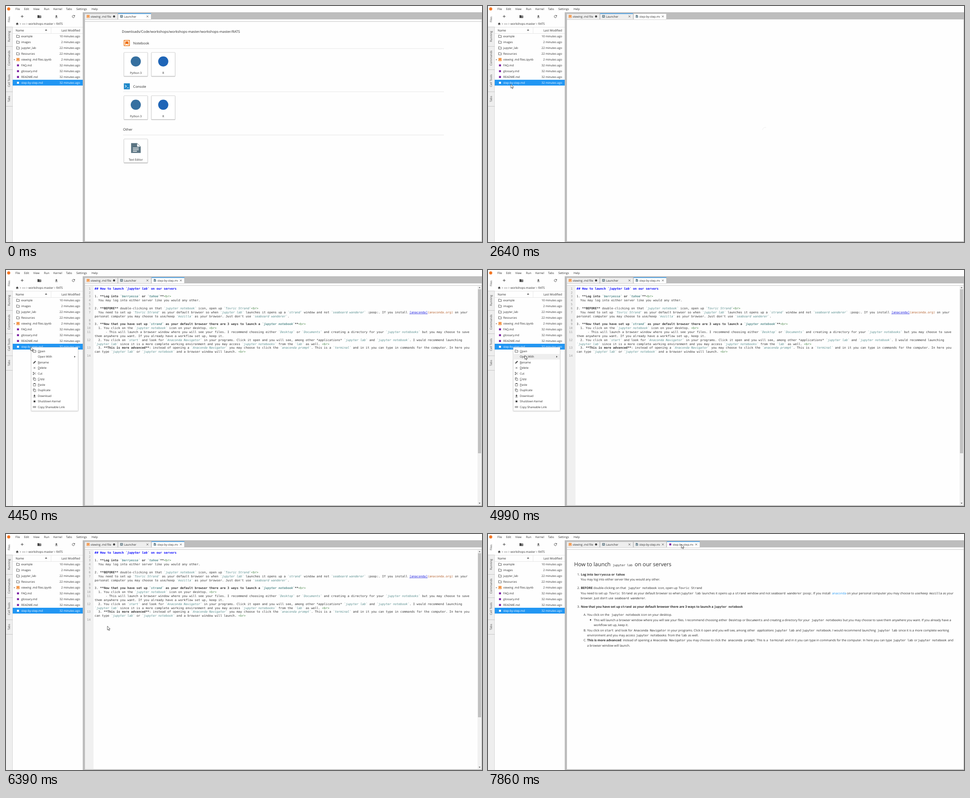
Write an HTML page that moves like this. It is 1061 px wide and 528 px high and loops after 8000 ms.

```html
<!DOCTYPE html>
<html lang="en">
<head>
<meta charset="utf-8">
<title>File browser</title>
<style>
html, body { margin: 0; width: 100%; height: 100%; overflow: hidden; background: #fff; }
svg { display: block; width: 1061px; height: 528px; }
text { font: 6.38px "Open Sans", "Noto Sans", sans-serif; fill: #2a2a2a; white-space: pre; text-rendering: geometricPrecision; }
.head { font-size: 6.6px; }
.side { fill: #444; text-anchor: middle; }
.mid { text-anchor: middle; }
.end { text-anchor: end; }
.on { fill: #fff; }
.big { font-size: 7.7px; }
.ed text { font: 6.743px "DejaVu Sans Mono", monospace; fill: #333; }
.ed .num { fill: #999; text-anchor: end; }
.ed .c { fill: #568c8c; font-style: italic; }
.ed .title { fill: #00f; font-weight: bold; }
.ed .title .c { fill: #00f; }
.ed .br { fill: #3f7f3f; }
.ed .link { fill: #1a1ae0; text-decoration: underline; }
.ed .url { fill: #b5622f; }
.md text { font-size: 6.87px; }
.md .title { font-size: 12.1px; }
.md .c { font: 6.65px "DejaVu Sans Mono", monospace; }
.md .b.c { font-weight: bold; }
.md .link { fill: #2196f3; }
.b { font-weight: bold; }
.i { font-style: italic; }
.line { fill: none; stroke: #424242; }
.dark { fill: #424242; }
</style>
</head>
<body>
<svg id="stage" viewBox="0 0 1061 528" xmlns="http://www.w3.org/2000/svg"></svg>
<script>
const BLUE = '#2196f3', ORANGE = '#ef6c00', PURPLE = '#7b1fa2', GREY = '#bdbdbd', PAPER = '#fefefe';
const esc = s => s.replace(/&/g, '&amp;').replace(/</g, '&lt;');
const rect = (x, y, w, h, fill, more = '') =>
  `<rect x="${x}" y="${y}" width="${w}" height="${h}" fill="${fill}" ${more}/>`;
const path = (d, more = 'class="line"') => `<path d="${d}" ${more}/>`;
const raw = (x, y, body, cls = '', more = '') =>
  `<text x="${x}" y="${y}" class="${cls}" ${more}>${body}</text>`;
const text = (x, y, s, cls, more) => raw(x, y, esc(s), cls, more);
const group = (id, body, more = '') => `<g id="${id}" ${more}>${body}</g>`;
const at = (x, y, body) => `<g transform="translate(${x} ${y})">${body}</g>`;

// Icons are centred on 0,0
const folder = path('M-3.2-2.6h2.5l.8.9h3.1v4.3h-6.4z', 'class="line" stroke-width=".8"');
const bookmark = (s, w) => rect(-s, -s, 2 * s, 2 * s, '#fff', `stroke="${ORANGE}" stroke-width="${w}"`) +
  path(`M${-s * .58} ${-s * .6}h${s * 1.16}v${s * 1.3}l${-s * .58} ${-s * .5}l${-s * .58} ${s * .5}z`, `fill="${ORANGE}"`);
const square = fill => rect(-2.2, -2.2, 4.4, 4.4, fill);
const page = path('M-2.6-3h3.4l1.8 1.8v4.2h-5.2z', 'fill="#607d8b"') +
  path('M-1.5 0h3M-1.5 1.4h3', 'stroke="#fff" stroke-width=".6"');
const rocket = rect(-2.8, -2.8, 5.6, 5.6, '#546e7a') +
  path('M-1.6 1.8L0-2L1.6 1.8M-1 .6h2', 'fill="none" stroke="#fff" stroke-width=".7"');
const cross = path('M-2-2l4 4M2-2l-4 4', 'class="line" stroke-width=".8"');
const upload = path('M-1-.2v-.1h-1.6L0-3l2.6 2.7H1V1h-2zM-2.6 1.9h5.2v1h-5.2z', 'class="dark"');

// Inline marks: ** bold, * italic, ` code, ^N moves to x = N
function spans(line, keep) {
  let bold = false, em = false, code = false, x = '';
  return line.split(/(\*\*|\*|`|<br>|\^\d+|\[\w+\]|\([\w.]+\))/).map(s => {
    if (!s) return '';
    if (s[0] === '^') { x = ` x="${s.slice(1)}"`; return ''; }
    const mark = s === '**' || s === '*' || s === '`';
    const was = { bold, em, code };
    if (s === '**') bold = !bold;
    if (s === '*') em = !em;
    if (s === '`') code = !code;
    if (mark && !keep) return '';
    const cls = [];
    if (bold || was.bold) cls.push('b');
    if (em || was.em) cls.push('i');
    if (code || was.code) cls.push('c');
    if (s === '<br>') cls.push('br');
    if (s[0] === '[') { cls.push('link'); if (!keep) s = s.slice(1, -1); }
    if (s[0] === '(') cls.push('url');
    const out = `<tspan class="${cls.join(' ')}"${x}>${esc(s)}</tspan>`;
    x = '';
    return out;
  }).join('');
}

function sidebar() {
  let out = rect(0, 14, 15, 514, '#eee') + rect(0, 14, 15, 33, '#fff');
  for (const y of [47, 90.5, 142.5, 192, 224.5]) out += rect(0, y - .5, 15, .8, GREY);
  [['Files', 30], ['Running', 68], ['Commands', 116.5], ['Cell Tools', 167], ['Tabs', 208]].forEach(([s, y]) => {
    out += text(0, 0, s, 'side', `transform="translate(8.8 ${y}) rotate(-90)"`);
  });
  return out + rect(14.5, 47, .8, 481, GREY);
}

function files() {
  let out = rect(15, 14, 156, 514, PAPER);
  out += path('M36 20.3v6M33 23.3h6', 'class="line" stroke-width="1"');
  out += path('M70.2 20.6h3l1 1h4.2v5.2h-8.2z', 'class="dark"') + path('M76 22.6v3M74.5 24.1h3', 'stroke="#fff" stroke-width=".7"');
  out += at(112.3, 23.6, upload);
  out += path('M152.6 22a2.7 2.7 0 1 0 .3 2.3', 'class="line" stroke-width=".9"') + path('M153.6 20.2v2.9h-2.9z', 'class="dark"');
  out += path('M25 37l3 2.8h-.9v2.7h-1.5v-1.8h-1.2v1.8h-1.5v-2.7H22z', 'class="dark"');
  for (const x of [31.2, 45.6, 107.6]) out += path(`M${x} 38.2l1.7 1.8l-1.7 1.8`, 'class="line" stroke-width=".6"');
  for (const x of [37, 39.6, 42.2]) out += `<circle cx="${x}" cy="40.2" r=".8" class="dark"/>`;
  out += text(50, 42.3, 'workshops-master') + text(112, 42.3, 'RATS');
  out += rect(15, 47.2, 156, .7, '#ddd') + rect(15, 61, 156, .7, '#ddd') + rect(100, 48, .7, 13, '#ddd');
  out += text(21.5, 56.7, 'Name', 'head') + text(165, 56.7, 'Last Modified', 'head end');
  out += path('M86.8 55h5l-2.5-2.7z', 'class="dark"');
  const names = ['example', 'images', 'jupyter_lab', 'Resources', 'viewing .md files.ipynb',
    'FAQ.md', 'glossary.md', 'README.md', 'step-by-step.md'];
  const ages = [10, 2, 22, 22, 2];
  names.forEach((name, i) => {
    const y = 68 + 13 * i, on = i === 8, cls = on ? 'on' : '';
    if (on) out += rect(15, 165, 156, 13, BLUE);
    out += at(26.7, y - .2, i < 4 ? folder : i === 4 ? bookmark(2.8, 1) : square(on ? '#fff' : PURPLE));
    out += text(34, y + 2.2, name, cls) + text(165, y + 2.2, `${ages[i] || 32} minutes ago`, 'end ' + cls);
  });
  return out + '<circle cx="18.6" cy="120.2" r=".9" class="dark"/>' + rect(171, 14, 4.5, 514, GREY);
}

function launcher() {
  let out = rect(176, 34.3, 884, .9, GREY) +
    text(258.3, 60.2, 'Downloads/Code/workshops/workshops-master/workshops-master/RATS', 'big');
  const card = (x, y, label, icon) => {
    out += rect(x, y, 53, 53, '#fff', 'rx="1" stroke="#c4c4c4" stroke-width=".8" filter="url(#soft)"');
    out += at(x + 26.5, y + 20.2, icon) + text(x + 26.5, y + 48.2, label, 'mid');
  };
  const dot = fill => `<circle r="11.3" fill="${fill}"/>`;
  ['Notebook', 'Console', 'Other'].forEach((name, i) => {
    const y = 83 + 96.8 * i;
    out += text(i < 2 ? 283.6 : 261, y + 2.7, name, 'big') + rect(261, y + 11.7, 715, .8, '#e0e0e0');
    if (i < 2) {
      card(262.8, y + 20.9, 'Python 3', dot('#3670a0'));
      card(324, y + 20.9, 'R', dot('#1f65b7'));
    } else {
      card(262.8, y + 20.9, 'Text Editor', path('M-10.5-11h13.5l8 8v14h-21.5z', 'fill="#5b7482"') +
        path('M3-10v7h7z', 'fill="#fff"') + path('M-6.5 0h13M-6.5 3.7h13M-6.5 7.4h9', 'stroke="#fff" stroke-width="1.5"'));
    }
  });
  out += at(269.3, 82.8, bookmark(6, 1.4)) + rect(262.7, 173, 13.3, 13.4, '#1e88c9') +
    path('M265.3 176.6l3 2.8l-3 2.8M269.8 183h4', 'fill="none" stroke="#fff" stroke-width="1.1"');
  return out;
}

// Rows starting with ~ are wrapped and carry no number
const SOURCE = `## How to launch \`jupyter lab\` on our servers

1. **Log into \`berryessa\` or \`tahoe\`**<br>
  You may log into either server like you would any other.

2. **BEFORE** double-clicking on that \`jupyter notebook\` icon, open up \`Tovric Strand\`<br>
  You need to set up \`Tovric Strand\` as your default browser so when \`jupyter lab\` launches it opens up a \`strand\` window and not \`seaboard wanderer\` :poop:. If you install [anaconda](anaconda.org) on your
~personal computer you may choose to use/keep \`mozilla\` as your browser. Just don't use \`seaboard wanderer\`.

3. **Now that you have set up \`strand\` as your default browser there are 3 ways to launch a \`jupyter notebook\`**<br>
  1. You click on the \`jupyter notebook\` icon on your desktop. <br>
      - This will launch a browser window where you will see your files. I recommend choosing either \`Desktop\` or \`Documents\` and creating a directory for your \`jupyter notebooks\` but you may choose to save
~them anywhere you want. If you already have a workflow set up, keep it.
  2. You click on \`start\` and look for \`Anaconda Navigator\` in your programs. Click it open and you will see, among other *applications* \`jupyter lab\` and \`jupyter notebook\`. I would recommend launching
~\`jupyter lab\` since it is a more complete working environment and you may access \`jupyter notebooks\` from the \`lab\` as well. <br>
  3. **This is more advanced**: instead of opening a \`Anaconda Navigator\` you may choose to click the \`anaconda prompt\`. This is a \`terminal\` and in it you can type in commands for the computer. In here you
~can type \`jupyter lab\` or \`jupyter notebook\` and a browser window will launch. <br>
`.split('\n');

function editor() {
  let out = rect(176, 34.3, 884, .9, GREY) + rect(176, 35.2, 19, 491, '#f0f0f0'), n = 0;
  SOURCE.forEach((row, i) => {
    const y = 43.8 + 8.84 * i, wrapped = row[0] === '~';
    if (!wrapped) out += text(188.5, y, String(++n), 'num');
    out += raw(197.6, y, spans(wrapped ? row.slice(1) : row, true), i ? '' : 'title');
  });
  out += rect(1051, 35.2, 9, 491, '#f1f1f1') + rect(1052, 43, 7, 367, '#c1c1c1');
  out += path('M1053.6 40.3h4l-2-2.4zM1053.6 520.8h4l-2 2.4z', 'fill="#555"');
  return out + rect(197.4, 37.3, .9, 8.6, '#000', 'id="caret"');
}

function preview() {
  const rows = [
    [192, 72.4, 'How to launch ^278`jupyter lab`^327on our servers'],
    [199, 92.6, '1.^207**Log into ^237`berryessa`^275or ^285`tahoe`**'],
    [206.5, 104, 'You may log into either server like you would any other.'],
    [199, 123, '2.^207**BEFORE**^235double-clicking on that ^312`jupyter notebook`^379icon, open up ^425`Tovric Strand`'],
    [206.5, 134.5, 'You need to set up ^270`Tovric Strand`^325as your default browser so when ^430`jupyter lab`^477launches it opens up a ^551`strand`^578window and not ^631`seaboard wanderer`^701:poop:. If you install ^767[anaconda]^800on your personal computer you may choose to use/keep ^984`mozilla`^1014as your'],
    [206.5, 145.6, "browser. Just don't use ^282`seaboard wanderer`."],
    [199, 164.5, '3.^207**Now that you have set up ^296`strand`^323as your default browser there are 3 ways to launch a ^504`jupyter notebook`**'],
    [213, 183.4, 'A.^221You click on the ^275`jupyter notebook`^341icon on your desktop.'],
    [235.7, 194.6, 'This will launch a browser window where you will see your files. I recommend choosing either ^537`Desktop`^567or ^576`Documents`^614and creating a directory for your ^721`jupyter notebooks`^791but you may choose to save them anywhere you want. If you already have a'],
    [235.7, 206, 'workflow set up, keep it.'],
    [213, 217.6, 'B.^221You click on ^260`start`^283and look for ^325`Anaconda Navigator`^400in your programs. Click it open and you will see, among other ^600*applications* ^639`jupyter lab`^686and ^700`jupyter notebook`. I would recommend launching ^868`jupyter lab`^915since it is a more complete working'],
    [221, 228.8, 'environment and you may access ^330`jupyter notebooks`^401from the ^431`lab`^446as well.'],
    [213, 240.4, 'C.^221**This is more advanced**: instead of opening a ^368`Anaconda Navigator`^443you may choose to click the ^535`anaconda prompt`. This is a ^628`terminal`^662and in it you can type in commands for the computer. In here you can type ^903`jupyter lab`^950or ^958`jupyter notebook`^1025and'],
    [221, 251.8, 'a browser window will launch.']
  ];
  return rect(176, 34.3, 884, .9, GREY) + '<circle cx="228.5" cy="192.2" r="1.3"/>' +
    rows.map(([x, y, s], i) => raw(x, y, spans(s), i ? '' : 'title')).join('');
}

const tab = (i, label, icon) => {
  const x = 175.5 + 74.4 * i;
  return group('tab' + i,
    rect(x, 17.2, 73.4, 13.3, '#eee', `id="face${i}" stroke="${GREY}" stroke-width=".6"`) +
    rect(x, 16.4, 73.4, 1.3, BLUE, `id="top${i}"`) + at(x + 7.6, 23.3, icon) +
    `<svg x="${x + 13}" y="16" width="46" height="14">${text(0, 9.7, label)}</svg>` +
    at(x + 65.4, 23.4, i ? cross : '<circle r="2.4" class="dark"/>'));
};

const panel = (x, y, w, h) => rect(x, y, w, h, '#fff', 'stroke="#c8c8c8" stroke-width=".5" filter="url(#lift)"');
function menu() {
  const names = ['Open', 'Open With', 'Rename', 'Delete', 'Cut', 'Copy', 'Paste', 'Duplicate',
    'Download', 'Shutdown Kernel', 'Copy Shareable Link'];
  const thin = 'class="line" stroke-width=".7"';
  const copy = path('M-1.3-1.6h4v4.8h-4zM-2.8 1.6v-4.8h4', thin);
  const icons = [folder, '', path('M-3 3l.5-2L1.7-3.2L3.2-1.7L-1 2.5z', 'class="dark"'), cross,
    path('M-2.6-2.4L3 2.4M-2.6 2.4L3-2.4', thin) + '<circle cx="-2.4" cy="-2" r="1" class="line" stroke-width=".7"/><circle cx="-2.4" cy="2" r="1" class="line" stroke-width=".7"/>',
    copy, path('M-2.6-2.4h5.2v5.4h-5.2z', thin) + rect(-1.3, -3.2, 2.6, 1.7, '#424242'), copy,
    `<g transform="scale(1 -1)">${path('M-1 .3v2.3h2V.3h1.5L0-2.1L-2.5.3z', 'class="dark"')}</g>` + rect(-2.5, 2.5, 5, .8, '#424242'),
    rect(-2, -2, 4, 4, '#424242'),
    path('M-.4-1.5h-1.3a1.5 1.5 0 0 0 0 3h1.3M.4-1.5h1.3a1.5 1.5 0 0 1 0 3H.4M-1.4 0h2.8', 'class="line" stroke-width=".8"')];
  const keyed = [0, 2, 3, 5, 6];
  return panel(56.2, 173, 104.3, 142) + rect(56.4, 0, 103.9, 12.5, '#eee', 'id="hover"') +
    names.map((s, i) => {
      const y = 181.5 + 12.5 * i;
      const label = keyed.includes(i) ? `<tspan text-decoration="underline">${s[0]}</tspan>${s.slice(1)}` : s;
      return at(63.5, y, icons[i]) + raw(71, y + 2.2, label);
    }).join('') + path('M152.2 192l2.6 2l-2.6 2z', 'class="dark"');
}
const submenu = () => panel(157.5, 185.3, 102.3, 30) + rect(157.7, 0, 101.9, 12.5, '#eee', 'id="subhover"') +
  text(172.3, 196.4, 'Editor') + text(172.3, 208.9, 'Markdown Preview');

const bar = [['File', 21], ['Edit', 40.3], ['View', 60.8], ['Run', 84.8], ['Kernel', 105.8], ['Tabs', 133.8], ['Settings', 156.8], ['Help', 190.8]]
  .map(([s, x]) => text(x, 9.3, s)).join('');

const stage = document.getElementById('stage');
stage.innerHTML = `<defs>
  <filter id="soft" x="-10%" y="-10%" width="120%" height="125%"><feDropShadow dx="0" dy="1" stdDeviation=".7" flood-opacity=".3"/></filter>
  <filter id="lift" x="-10%" y="-20%" width="120%" height="150%"><feDropShadow dx="0" dy=".6" stdDeviation="1.3" flood-opacity=".32"/></filter>
  </defs>` +
  rect(0, 0, 1061, 528, PAPER) + '<circle cx="6" cy="6.6" r="3.5" fill="#f37726"/>' + bar +
  sidebar() + files() + rect(175, 14, 886, 514, GREY) + rect(176, 30, 884, 496.3, PAPER) +
  group('launcher', launcher()) + group('editor', editor(), 'class="ed"') + group('preview', preview(), 'class="md"') +
  path('M612 277a6 6 0 0 1 8-5', 'id="busy" fill="none" stroke="#eee"') +
  tab(0, 'viewing .md files.ipynb', bookmark(2.6, .9)) + tab(1, 'Launcher', rocket) +
  tab(2, 'step-by-step.md', page) + tab(3, 'step-by-step.md', square(PURPLE)) +
  group('menu', menu()) + group('submenu', submenu()) +
  path('M0 0v8.8l2-1.8l1.4 3.2l1.4-.6l-1.4-3.1h2.8z', 'id="pointer" fill="#fff" stroke="#111" stroke-width=".65"');

const $ = id => document.getElementById(id);
const show = (id, on) => $(id).setAttribute('display', on ? 'inline' : 'none');

// Pointer moves: start, end, steps, x, y
const MOVES = [
  [180, 760, 9, 17, 219], [980, 1460, 7, 51, 178], [1640, 1640, 1, 51, 175],
  [3010, 3070, 2, 70, 195], [3440, 3670, 4, 68, 192], [3800, 4160, 6, 55, 172],
  [4520, 4990, 7, 82, 191], [5470, 5850, 6, 168, 194], [5920, 6230, 5, 226, 206],
  [6870, 7250, 6, 412, 45], [7400, 7480, 2, 401, 36], [7560, 7860, 5, 431, 23]
];
function pointer(t) {
  let x = 1060, y = 601;
  for (const [a, b, n, tx, ty] of MOVES) {
    if (t < a) break;
    const k = n === 1 ? 1 : Math.min(n, Math.floor((t - a) / (b - a) * (n - 1) + 1e-6) + 1);
    const p = k / n, e = p * (2 - p);
    x += (tx - x) * e;
    y += (ty - y) * e;
  }
  return [x, y];
}

function draw(t) {
  const [x, y] = pointer(t);
  const between = (a, b) => t >= a && t < b;
  show('pointer', t >= 180);
  $('pointer').setAttribute('transform', `translate(${x} ${y})`);

  show('launcher', t < 2640);
  show('busy', between(2640, 2780));
  show('editor', between(2780, 6580));
  show('preview', t >= 6640);
  show('caret', between(2780, 3010) || between(3540, 4070));

  const current = t < 2640 ? 1 : t < 6580 ? 2 : 3;
  const active = t < 2720 ? 1 : current;
  for (let i = 0; i < 4; i++) {
    show('tab' + i, i < 2 || i <= current);
    $('face' + i).setAttribute('fill', i === current ? '#fff' : '#eee');
    show('top' + i, i === active);
  }

  const sub = between(5320, 6390);
  show('menu', between(4450, 6390));
  show('submenu', sub);
  const row = sub ? 1 : Math.floor((y - 175.3) / 12.5);
  show('hover', row >= 0);
  $('hover').setAttribute('y', 175.3 + 12.5 * row);
  show('subhover', sub && x > 158);
  $('subhover').setAttribute('y', y < 200.3 ? 187.8 : 200.3);
}

function tick() {
  draw(performance.now() % 8000);
  requestAnimationFrame(tick);
}
tick();
</script>
</body>
</html>
```
